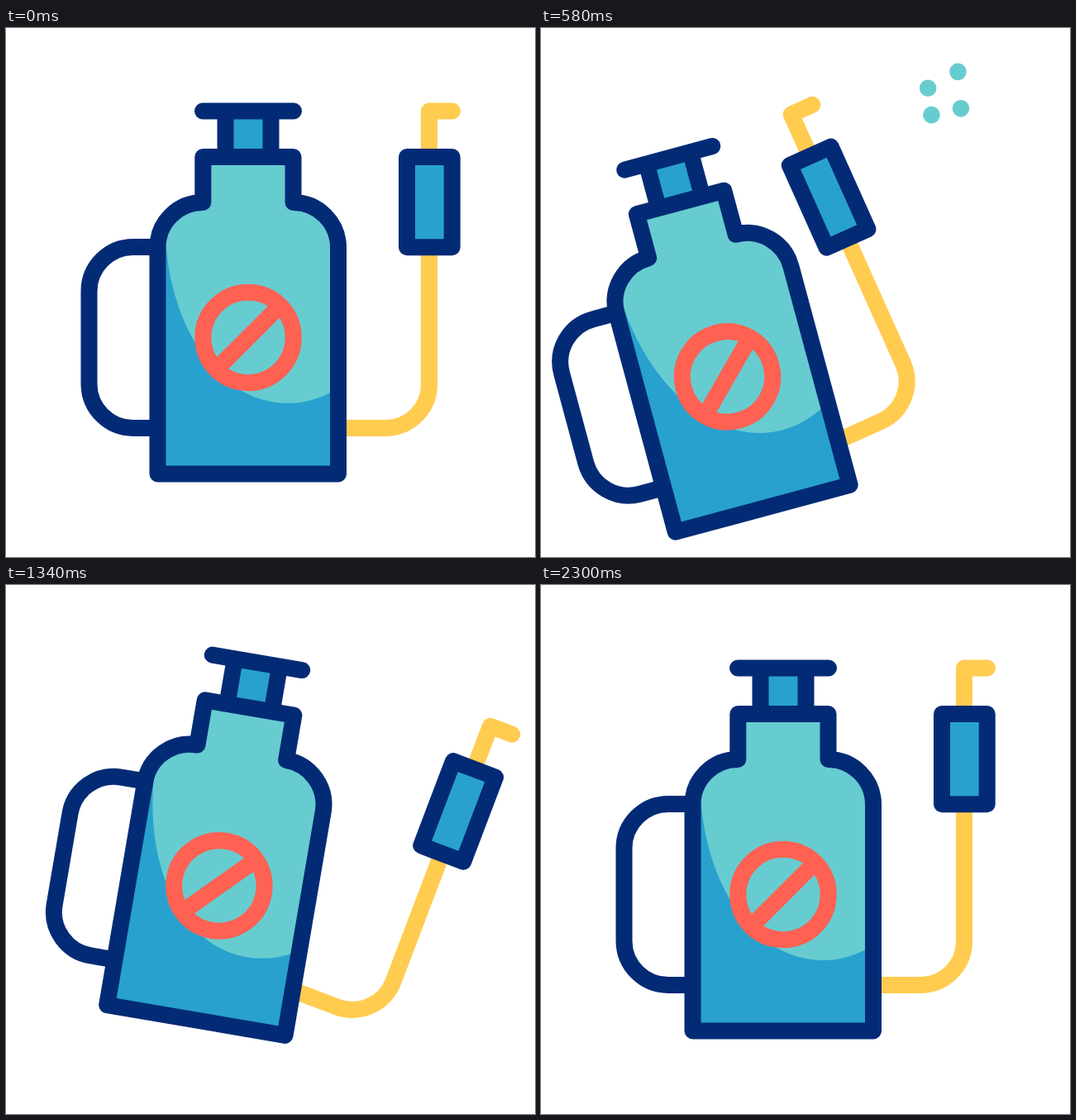
Write an HTML page that moves like this. It is 640x640 px and loops after 2.4 s.

```html
<!DOCTYPE html>
<html lang="en">
<head>
<meta charset="utf-8">
<title>Sprayer</title>
<style>
  html, body { margin: 0; width: 100%; height: 100%; overflow: hidden; background: #fff; }
  svg { display: block; width: 100vw; height: 100vh; }
  .line { fill: none; stroke-width: 20; stroke-linecap: round; stroke-linejoin: round; }
  .navy { stroke: #032b75; }
  .yellow { stroke: #ffcc50; }
  .red { stroke: #ff6152; }
  .blue { fill: #28a1ce; }
  .teal { fill: #67ccd0; }
</style>
</head>
<body>
<svg viewBox="0 0 640 640">
  <g id="body">
    <g id="gun">
      <path class="line yellow" d="M402 484H459A53 53 0 0 0 512 431V100.5H540"/>
      <rect class="line navy" style="fill:#28a1ce" x="485" y="156" width="54.7" height="109.3"/>
    </g>
    <path class="line navy" d="M183 265H154A53.5 53.5 0 0 0 100.5 318.5V431A53.5 53.5 0 0 0 154 484H183"/>
    <path class="blue" d="M265 100H320V156H265Z"/>
    <path class="line navy" d="M265.5 100.5V156M320.5 100.5V156M238 100.5H348"/>
    <path class="blue" d="M184 240H402V540H184Z"/>
    <path class="teal" d="M238 156H348V211A54.5 54.5 0 0 1 402 265V436Q372 454 341 454C262 454 200 370 193 255L184 265A54 54 0 0 1 238 211Z"/>
    <path class="line navy" d="M238.3 156H347.5V211A54.5 54.5 0 0 1 402 265.5V539.5H183.5V265.5A54.5 54.5 0 0 1 238.3 211Z"/>
    <circle class="line red" cx="293" cy="374.5" r="54.7"/>
    <path class="line red" style="stroke-linecap:butt" d="M331 336.5L255 412.5"/>
  </g>
  <g id="spray" class="teal"></g>
</svg>
<script>
const LOOP = 2400;

// time, shift x, shift y, body angle, gun angle
const KEYS = [
  [0, 0, 0, 0, 0],
  [340, -46, 29, -8.95, -14.4],
  [620, -83, 50, -15.3, -24.5],
  [840, -71, 18, -5.2, -17.3],
  [1100, -44, -32, 9.8, -7],
  [1160, -38, -37, 11, 1],
  [1340, -26, -10, 9.7, 20.8],
  [1390, -24.5, 0, 7.5, 21],
  [1660, -20.3, 51, -5.45, -13.6],
  [1690, -19.5, 51.5, -5.6, -14.2],
  [1980, -5.7, 20.7, -2, -9.2],
  [2285, 0, 0, 0, 0]
];

// Smooth slope at key i that never overshoots
function slope(i, col) {
  if (i === 0 || i === KEYS.length - 1) return 0;
  const [a, b, c] = [KEYS[i - 1], KEYS[i], KEYS[i + 1]];
  const h0 = b[0] - a[0], h1 = c[0] - b[0];
  const d0 = (b[col] - a[col]) / h0, d1 = (c[col] - b[col]) / h1;
  if (d0 * d1 <= 0) return 0;
  return 3 * (h0 + h1) / ((2 * h1 + h0) / d0 + (h1 + 2 * h0) / d1);
}

function pose(t, col) {
  const n = KEYS.findIndex(k => k[0] > t);
  if (n < 0) return 0;
  const a = KEYS[n - 1], b = KEYS[n], h = b[0] - a[0];
  const u = (t - a[0]) / h, s = u * u * (3 - 2 * u), v = 1 - u;
  return a[col] + (b[col] - a[col]) * s +
    h * u * v * (v * slope(n - 1, col) - u * slope(n, col));
}

// Drops: reach x, rise y, moment of vanishing
const DROPS = [
  [72, -44, 0.94],
  [123, -72, 0.95],
  [128, -9.4, 1.005],
  [78, 1.6, 0.94]
];
const BURSTS = [[350, 417], [640, 380]]; // start time, origin x
const LIFE = 500, FALL = 75;

const bodyEl = document.getElementById("body");
const gunEl = document.getElementById("gun");
const sprayEl = document.getElementById("spray");
const drops = BURSTS.flatMap(([start, x]) => DROPS.map(([dx, dy, end]) => {
  const el = document.createElementNS("http://www.w3.org/2000/svg", "circle");
  el.setAttribute("r", 10.3);
  sprayEl.append(el);
  return { el, start, x, dx, dy, end };
}));

const clamp = v => Math.max(0, Math.min(1, v));

function draw(t) {
  const [x, y, r, g] = [1, 2, 3, 4].map(col => pose(t, col));
  bodyEl.setAttribute("transform", `translate(${x} ${y}) rotate(${r} 293 320)`);
  gunEl.setAttribute("transform", `rotate(${g - r} 402 484)`);
  for (const d of drops) {
    const u = clamp((t - d.start) / LIFE), out = u * (2 - u);
    d.el.setAttribute("cx", d.x + d.dx * out);
    d.el.setAttribute("cy", 88 + d.dy * out + FALL * u * u);
    d.el.setAttribute("opacity", u < 1 ? clamp(u / 0.15) * clamp((d.end - u) / 0.4) : 0);
  }
}

const begin = performance.now();
function tick() {
  draw((performance.now() - begin) % LOOP);
  requestAnimationFrame(tick);
}
tick();
</script>
</body>
</html>
```
